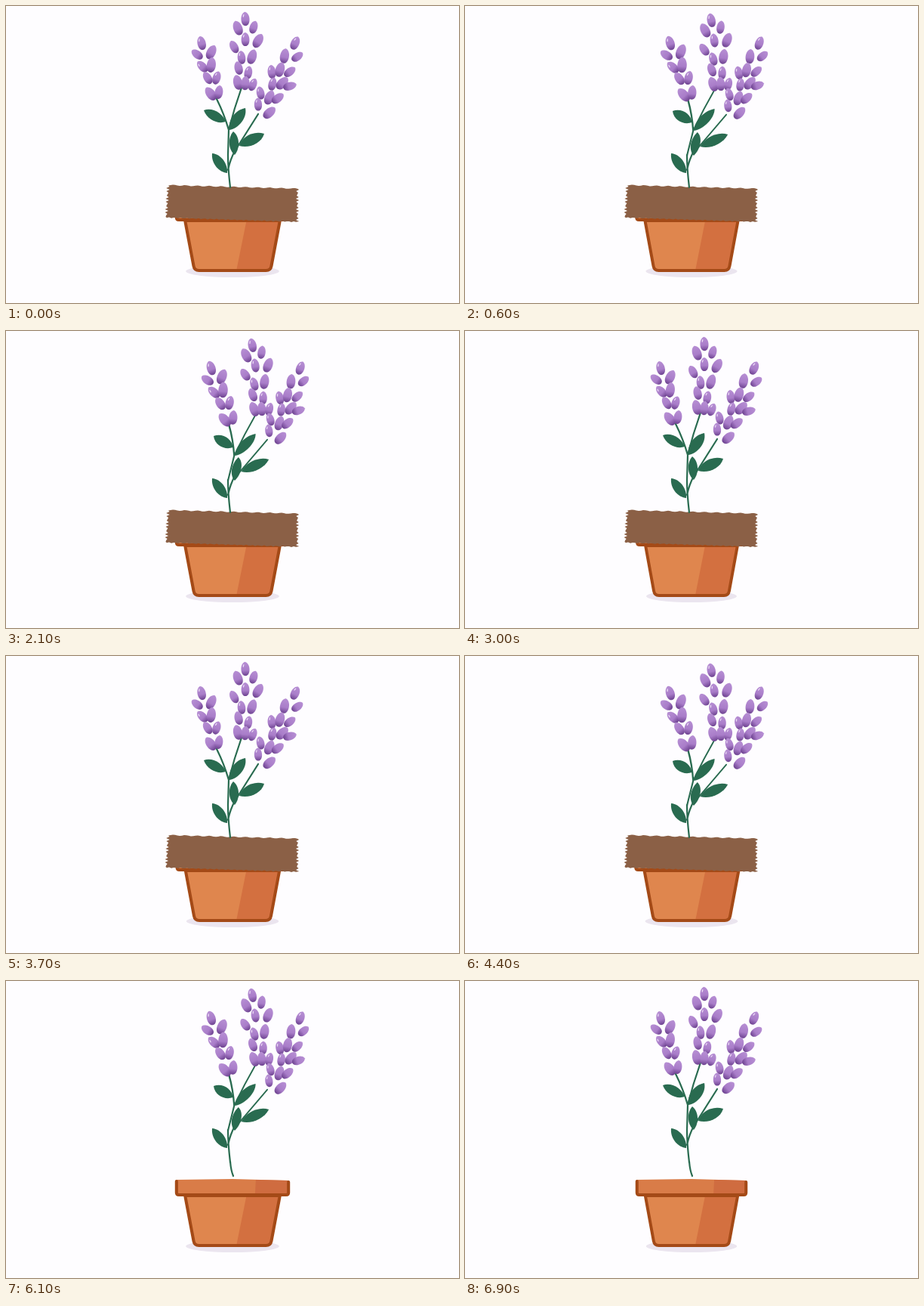
An HTML page with a canvas that plays this animation: 600x393 px, repeating every 7000 ms.

```html
<!DOCTYPE html>
<html lang="en">
<head>
<meta charset="utf-8">
<title>Lavender in a pot</title>
<style>
html, body { margin: 0; width: 100%; height: 100%; overflow: hidden; background: #fefdff; }
canvas { display: block; }
</style>
</head>
<body>
<canvas id="stage" width="600" height="393"></canvas>
<script>
const ctx = document.getElementById('stage').getContext('2d');
const LOOP = 7000, POSE_TIME = 490, POSE_START = 615;
const SOIL_END = 6000, PULSE = 2050;
const GREEN = '#296b50', EDGE = '#a44a17';
const RAD = Math.PI / 180;

// Petals fan out from a slanted axis; shift, turn and size apply to the leaning pose.
const left = {
  x: 277, y: 118, axis: -15, fan: 4, shift: 19, turn: -4.5, size: 1.04,
  petals: [[259, 49], [272, 61], [253, 64], [260, 80], [272, 78],
    [267, 95], [279, 95], [271, 116], [282, 114]]
};
const middle = {
  x: 316, y: 104, axis: 3, fan: 1.8, shift: 22, turn: -8.5, size: 1,
  petals: [[317, 17], [307, 29], [328, 28], [317, 44], [334, 46], [302, 54],
    [312, 68], [326, 67], [308, 82], [321, 88], [307, 101], [317, 102], [327, 104]]
};
const right = {
  x: 345, y: 130, axis: 25, fan: 2.5, shift: 14, turn: -4.5, size: .98,
  petals: [[383, 49], [369, 66], [386, 67], [352, 87], [363, 84], [376, 87], [353, 103],
    [366, 102], [376, 106], [337, 115], [349, 121], [360, 122], [334, 130], [349, 141]]
};

const violet = ctx.createLinearGradient(0, -.5, 0, .5);
violet.addColorStop(0, '#b78fd4');
violet.addColorStop(.6, '#a97dc9');
violet.addColorStop(1, '#6c418f');

function fill(path, color) {
  ctx.fillStyle = color;
  ctx.fill(new Path2D(path));
}

function stroke(path, color, width) {
  ctx.strokeStyle = color;
  ctx.lineWidth = width;
  ctx.lineCap = ctx.lineJoin = 'round';
  ctx.stroke(new Path2D(path));
}

function petal(x, y, length, lean, glint) {
  ctx.save();
  ctx.translate(x, y);
  ctx.rotate(lean * RAD);
  ctx.scale(length, length);
  fill('M0-.5C.4-.4.4.5 0 .5S-.4-.4 0-.5', violet);
  if (glint) stroke('M-.1-.3L-.14-.17', '#ecdcf5', .07);
  ctx.restore();
}

function spike({ x, y, axis, fan, shift, turn, size, petals }, leaning) {
  ctx.save();
  ctx.translate(x, y);
  if (leaning) {
    ctx.translate(shift, 1);
    ctx.rotate(turn * RAD);
    ctx.scale(size, size);
  }
  petals.forEach(([px, py], i) => {
    const offset = px - x + (py - y) * Math.tan(axis * RAD);
    petal(px - x, py - y, 18.5 + 1.5 * Math.sin(i * 2), axis + fan * offset, i % 3 === 0);
  });
  ctx.restore();
}

function leaf(x, y, tipX, tipY) {
  ctx.save();
  ctx.translate(x, y);
  ctx.rotate(Math.atan2(tipY - y, tipX - x));
  const length = Math.hypot(tipX - x, tipY - y);
  ctx.scale(length, length);
  fill('M0 0C.2-.23.68-.3 1 0C.75.28.25.24 0 0', GREEN);
  ctx.restore();
}

function plant(leaning) {
  const shear = leaning ? .22 : 0, bendY = 197;
  stroke('M297 240Q294 215 294 197M294 217Q297 203 303 192', GREEN, 2.2);
  leaf(293, 221, 273, 195);
  ctx.save();
  ctx.transform(1, 0, -shear, 1, shear * bendY, leaning ? 1 : 0);
  stroke('M294 197L295 164Q289 143 279 123M295 164Q302 136 312 108M303 192L334 143', GREEN, 2.2);
  leaf(291, 153, 262, 138);
  leaf(296, 164, 317, 135);
  leaf(309, 185, 342, 169);
  leaf(303, 197, 301, 166);
  ctx.restore();
  for (const part of [left, middle, right]) spike(part, leaning);
}

function pot(stretch) {
  ctx.save();
  ctx.translate(300, 0);
  ctx.scale(stretch, 1);
  ctx.translate(-300, 0);
  ctx.fillStyle = '#ebe5ef';
  ctx.beginPath();
  ctx.ellipse(300, 351, 60, 8, 0, 0, 7);
  ctx.fill();
  const body = 'M239 284L250 344Q251 350 257 350H343Q349 350 350 344L361 284Z';
  fill(body, '#df864e');
  fill('M318 284H361L350 344Q349 350 343 350H305Z', '#d37040');
  stroke(body, EDGE, 4);
  fill('M228 263L300 262L372 264V283H228Z', '#d97c48');
  fill('M330 263L372 264V283H329Z', '#cf6c40');
  stroke('M228 265V280Q228 283 231 283H369Q372 283 372 280V266', EDGE, 4);
  ctx.restore();
}

// A brushed block with ragged sides.
function soil() {
  ctx.fillStyle = '#8b6046';
  ctx.beginPath();
  for (let x = 215; x <= 386; x += 3)
    ctx.lineTo(x, 237 + (x - 215) * .027 + Math.sin(x * 1.7) * .6);
  for (let y = 243; y <= 286; y += 2)
    ctx.lineTo(386 + Math.sin(y * 1.35) * 2.2, y);
  for (let x = 384; x >= 211; x -= 3)
    ctx.lineTo(x, 280 + (x - 211) * .032 + Math.sin(x * 1.3) * .6);
  for (let y = 279; y >= 238; y -= 2)
    ctx.lineTo(213.5 + (258 - y) * .06 + Math.sin(y * 1.35) * 2.4, y);
  ctx.fill();
}

function draw(now) {
  const t = now % LOOP;
  const phase = (t - POSE_START + 2 * POSE_TIME) % (2 * POSE_TIME);
  ctx.fillStyle = '#fefdff';
  ctx.fillRect(0, 0, 600, 393);
  pot(1.014 + .016 * Math.cos(2 * Math.PI * t / PULSE));
  if (t < SOIL_END) soil();
  else stroke('M297 239Q298 251 301 258', GREEN, 2.2);
  plant(phase >= POSE_TIME);
  requestAnimationFrame(draw);
}
requestAnimationFrame(draw);
</script>
</body>
</html>
```
